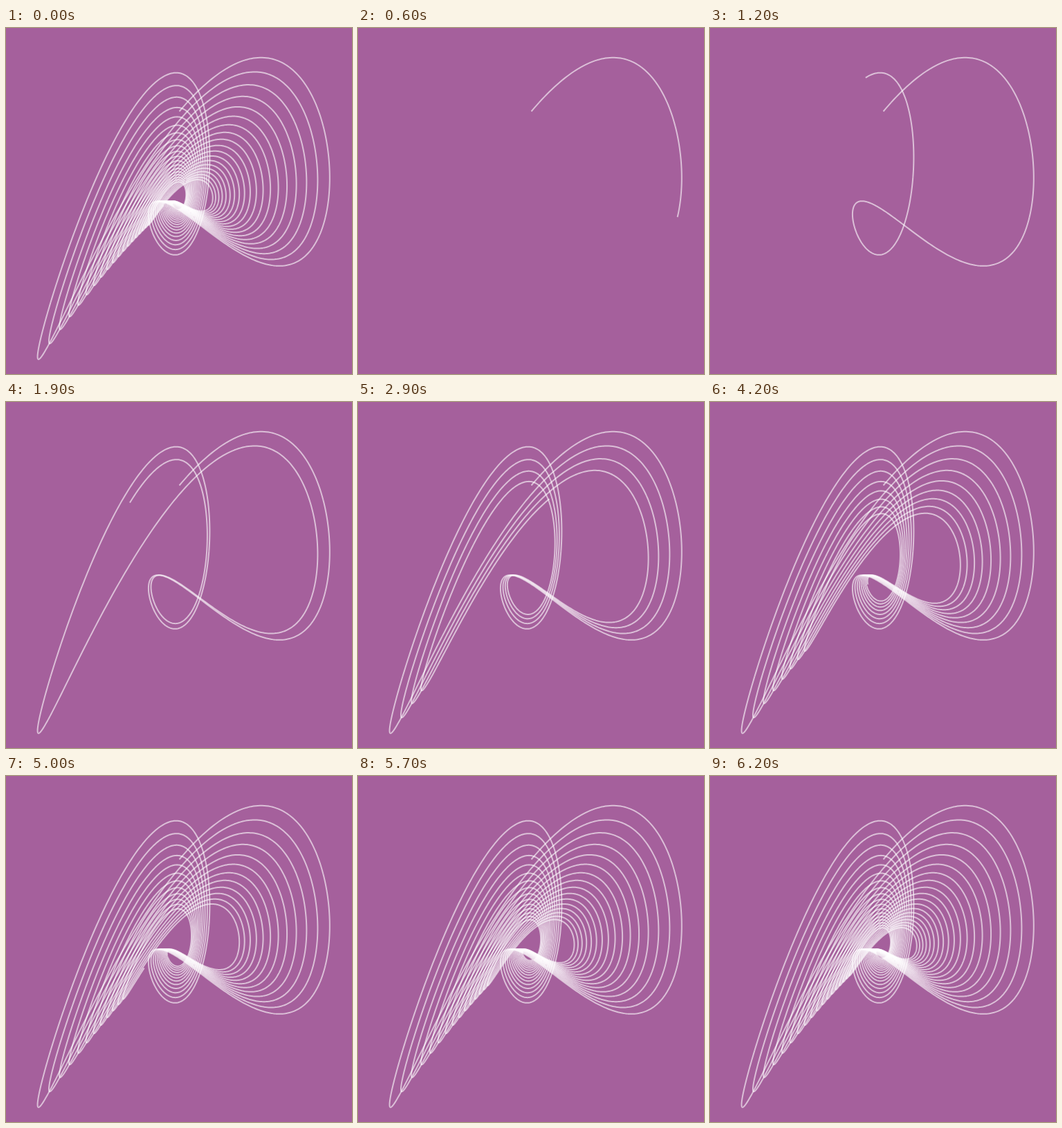
These frames come from a looping animation (500 by 500 pixels, 6.3 s). An HTML page with a canvas:

```html
<!DOCTYPE html>
<html lang="en">
<head>
<meta charset="utf-8">
<title>Harmonograph</title>
<style>
  html, body { margin: 0; width: 100%; height: 100%; overflow: hidden; background: #a5609c; }
  canvas { display: block; width: 500px; height: 500px; }
</style>
</head>
<body>
<canvas id="stage" width="500" height="500"></canvas>
<script>
const ctx = document.getElementById('stage').getContext('2d');
const STEP_MS = 100;
const STEPS = 63;
const AMP = 125;
const CENTER = 250.5;
const { sin, exp } = Math;

// Two damped pendulums per axis.
const penX = t => CENTER + AMP * exp(-0.0133 * t) * (sin(t) + sin(2 * t));
const penY = t => CENTER - AMP * exp(-0.0167 * t) * (sin(2 * t + 0.2) + sin(3 * t + 1));

// The pen speeds up evenly from rest.
const phase = step => 0.03 * step * step;

// Each step is its own translucent stroke, so crossings grow brighter.
function strokeStep(step) {
  const from = phase(step - 1);
  const span = phase(step) - from;
  const count = Math.ceil(span / 0.01);
  ctx.beginPath();
  for (let i = 0; i <= count; i++) {
    const t = from + span * i / count;
    ctx.lineTo(penX(t), penY(t));
  }
  ctx.stroke();
}

function draw(steps) {
  ctx.fillStyle = '#a5609c';
  ctx.fillRect(0, 0, 500, 500);
  ctx.strokeStyle = 'rgba(255, 255, 255, 0.6)';
  ctx.lineWidth = 2;
  ctx.lineJoin = 'round';
  for (let s = 1; s <= steps; s++) strokeStep(s);
}

let shown = -1;
function tick() {
  // The loop opens on the finished figure.
  const steps = Math.floor(performance.now() / STEP_MS) % STEPS || STEPS;
  if (steps !== shown) draw(shown = steps);
  requestAnimationFrame(tick);
}
tick();
</script>
</body>
</html>
```
